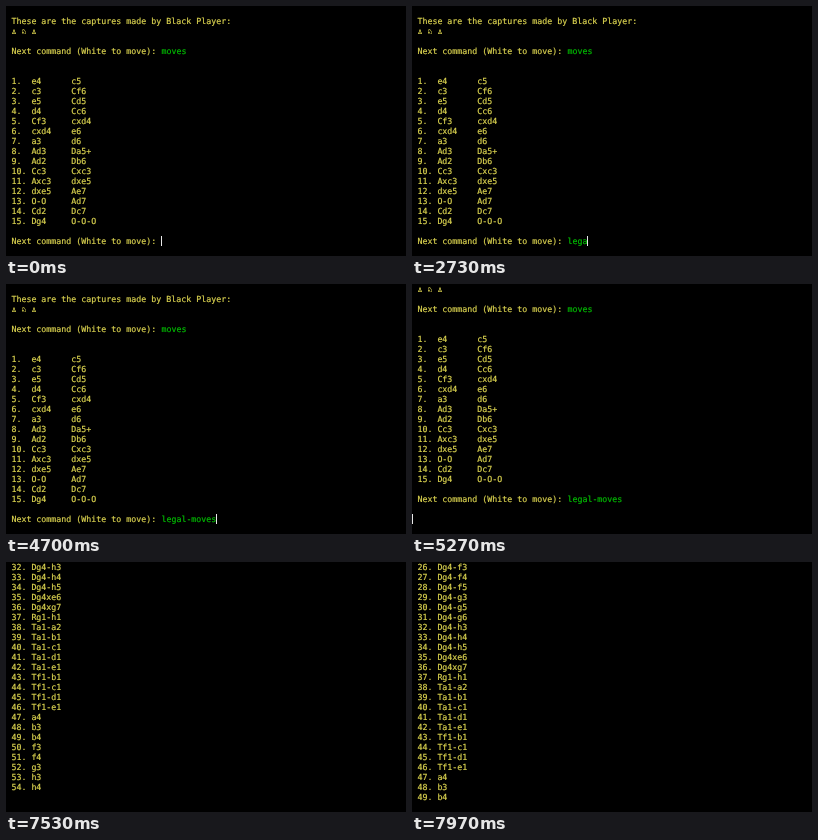
Write an HTML page with a canvas that moves like this. It is 400 by 250 pixels and loops after 8000 ms.

```html
<!DOCTYPE html>
<html lang="en">
<head>
<meta charset="utf-8">
<title>Chess terminal</title>
<style>
  html, body { margin: 0; width: 100%; height: 100%; overflow: hidden; background: #000; }
  canvas { display: block; }
</style>
</head>
<body>
<canvas id="screen" width="400" height="250"></canvas>
<script>
const ctx = document.getElementById('screen').getContext('2d');
const LOOP = 8000, ROWS = 24, ROW = 10, COL = 5;
const YELLOW = '#dcd450', GREEN = '#00bc00', WHITE = '#e8e8e8';
const BLINK = 533;
const PROMPT = ' Next command (White to move): ';
const COMMAND = 'legal-moves';
const KEY_TIMES = [1830, 2100, 2430, 2730, 3070, 3570, 3830, 4000, 4200, 4470, 4700];
const ENTER = 5195, PRINTED = 5297, SCROLL_BACK = 7500, SCROLL_STEP = 75;

const played = ('e4 c5 c3 Cf6 e5 Cd5 d4 Cc6 Cf3 cxd4 cxd4 e6 a3 d6 Ad3 Da5+ Ad2 Db6 ' +
  'Cc3 Cxc3 Axc3 dxe5 dxe5 Ae7 O-O Ad7 Cd2 Dc7 Dg4 O-O-O').split(' ');

const from = (piece, targets) => targets.split(' ').map(t => piece + t);
const FIRST_LEGAL = 26;
const legal = [
  ...from('Dg4', '-f3 -f4 -f5 -g3 -g5 -g6 -h3 -h4 -h5 xe6 xg7'),
  'Rg1-h1',
  ...from('Ta1', '-a2 -b1 -c1 -d1 -e1'),
  ...from('Tf1', '-b1 -c1 -d1 -e1'),
  ...'a4 b3 b4 f3 f4 g3 h3 h4'.split(' ')
];

// The scrollback, indexed by absolute line number
const COMMAND_LINE = 23, LAST_LINE = 81;
const lines = [];
const numbered = (n, text) => ' ' + `${n}.`.padEnd(4) + text;
lines[1] = ' These are the captures made by Black Player:';
lines[2] = ' ♙ ♘ ♙';
lines[4] = lines[COMMAND_LINE] = lines[LAST_LINE] = PROMPT;
for (let i = 0; i < 15; i++)
  lines[7 + i] = numbered(i + 1, played[2 * i].padEnd(8) + played[2 * i + 1]);
legal.forEach((move, i) => {
  const n = FIRST_LEGAL + i;
  lines[COMMAND_LINE + 2 + n] = numbered(n, move);
});

function topLine(t) {
  if (t < ENTER) return 0;
  if (t < PRINTED) return 2;
  const bottom = LAST_LINE - ROWS + 1;
  return t < SCROLL_BACK ? bottom : bottom - 1 - Math.floor((t - SCROLL_BACK) / SCROLL_STEP);
}

function cursorAt(t, typed) {
  if (t >= PRINTED)
    return { line: LAST_LINE, col: PROMPT.length, on: Math.floor((t - PRINTED) / BLINK) % 2 === 0 };
  if (t >= ENTER) return { line: COMMAND_LINE + 2, col: 0, on: true };
  const on = typed > 0 || Math.floor((t + BLINK - 330) / BLINK) % 2 === 0;
  return { line: COMMAND_LINE, col: PROMPT.length + typed, on };
}

function draw(t) {
  const typed = KEY_TIMES.filter(k => t >= k).length;
  const top = topLine(t);
  const write = (text, line, col, color) => {
    const x = 0.4 + col * COL, y = (line - top) * ROW + 8;
    ctx.fillStyle = ctx.strokeStyle = color;
    ctx.fillText(text, x, y);
    ctx.strokeText(text, x, y);
  };

  ctx.fillStyle = '#000';
  ctx.fillRect(0, 0, 400, 250);
  ctx.font = '8.3px "DejaVu Sans Mono", monospace';
  ctx.textRendering = 'geometricPrecision';
  ctx.lineWidth = 0.2;

  for (let line = top; line < top + ROWS; line++) {
    if (lines[line]) write(lines[line], line, 0, YELLOW);
    if (line === 4) write('moves', line, PROMPT.length, GREEN);
    if (line === COMMAND_LINE) write(COMMAND.slice(0, typed), line, PROMPT.length, GREEN);
  }

  const cursor = cursorAt(t, typed);
  if (cursor.on && cursor.line < top + ROWS) {
    ctx.fillStyle = WHITE;
    ctx.fillRect(cursor.col * COL, (cursor.line - top) * ROW, 1, ROW);
  }
}

const start = performance.now();
function tick() {
  draw((performance.now() - start) % LOOP);
  requestAnimationFrame(tick);
}
tick();
</script>
</body>
</html>
```
